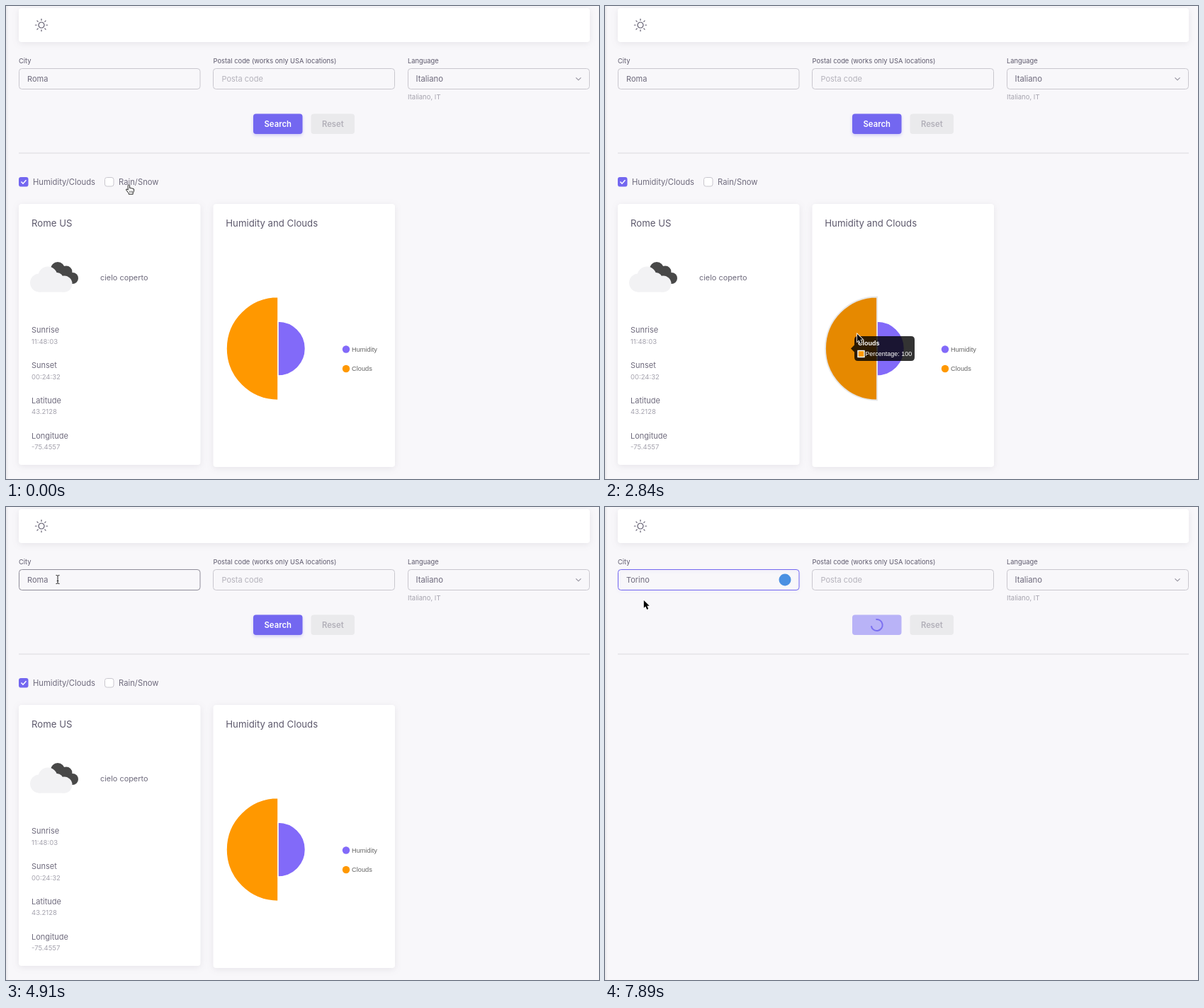
Recreate the animation shown at these times as an HTML page. Size 837 by 669 pixels, loop 8000 ms.

```html
<!DOCTYPE html>
<html lang="en">
<head>
<meta charset="utf-8">
<title>Weather dashboard</title>
<style>
  html, body { margin: 0; width: 100%; height: 100%; overflow: hidden; background: #f8f7fa; }
  svg { display: block; width: 837px; height: 669px; }
  text { font: 11px Inter, sans-serif; fill: #6f6b7d; white-space: pre; }
  .label { font-size: 9.35px; fill: #5d596c; }
  .title { font-size: 13.2px; fill: #5d596c; }
  .small { font-size: 9.5px; fill: #a5a3ae; }
  .check { font-size: 11.25px; }
  .hint { fill: #b4b2bb; }
  .button { font-size: 11.3px; font-weight: 600; text-anchor: middle; }
  .chart { font: 9.25px "Liberation Sans", Arial, sans-serif; fill: #666; }
  #tip text { font: 9px "Liberation Sans", Arial, sans-serif; fill: #fff; }
  #tip .head { font-weight: bold; }
  .field { fill: none; stroke: #c9c7ce; }
  .card { fill: #fff; filter: drop-shadow(0 2px 5px rgba(75, 70, 92, .1)); }
</style>
</head>
<body>
<svg viewBox="0 0 837 669">
  <defs>
    <linearGradient id="edge">
      <stop stop-color="#e9e8ec"/><stop offset="1" stop-color="#f8f7fa"/>
    </linearGradient>
    <path id="tick" d="M21.5 248.5l2.5 2.7 4.5-5" fill="none" stroke="#fff" stroke-width="1.5"/>
    <path id="cloudsArc" d="M384 411.5a73 73 0 0 0 0 146z"/>
    <path id="humidityArc" d="M384 446a38.5 38.5 0 0 1 0 77z"/>
  </defs>
  <rect width="4" height="669" fill="url(#edge)"/>

  <rect class="card" x="18" y="3" width="806" height="48" rx="4"/>
  <g id="sun" fill="none" stroke="#5d596c" stroke-width="1.2" stroke-linecap="round" transform="translate(50 27)">
    <circle r="4"/>
  </g>

  <text class="label" x="18" y="80.5">City</text>
  <text class="label" x="292.5" y="80.5">Postal code (works only USA locations)</text>
  <text class="label" x="567" y="80.5">Language</text>
  <rect id="cityField" class="field" x="18.5" y="88.5" width="255.5" height="29" rx="4"/>
  <rect class="field" x="292.5" y="88.5" width="256" height="29" rx="4"/>
  <rect class="field" x="567.5" y="88.5" width="256" height="29" rx="4"/>
  <rect id="selection" x="30" y="97" width="30" height="13" fill="#b4d5fe"/>
  <text id="city" x="30" y="107.3"></text>
  <rect id="caret" y="97" width="1" height="13" fill="#5d596c"/>
  <circle id="badge" cx="254" cy="103" r="8.5" fill="#4a90e2"/>
  <text class="hint" x="304.5" y="107.3">Posta code</text>
  <text x="578.5" y="106.8" style="font-size:11.3px">Italiano</text>
  <path d="M804.5 101.3l3.5 3.5 3.5-3.5" fill="none" stroke="#8f8c99" stroke-width="1.1"/>
  <text class="small" x="567" y="131.5">Italiano, IT</text>

  <rect id="search" x="349" y="152.5" width="69.5" height="28.5" rx="4"/>
  <text id="searchText" class="button" x="383.7" y="171" style="fill:#fff">Search</text>
  <path id="spinner" d="M5.66 5.66A8 8 0 1 1 5.66 -5.66" fill="none" stroke="#7b70f0" stroke-width="2"/>
  <rect x="430.5" y="152.5" width="61.5" height="28.5" rx="4" fill="#eaeaec"/>
  <text class="button" x="461.3" y="171" style="fill:#b2b0b9">Reset</text>
  <path d="M18 208h806" stroke="#dbdade"/>

  <g id="results">
    <rect x="18" y="242" width="13.5" height="13.5" rx="3" fill="#7367f0"/>
    <use href="#tick"/>
    <text class="check" x="38" y="253">Humidity/Clouds</text>
    <rect id="rainBox" x="139.5" y="242.5" width="12.5" height="12.5" rx="3"/>
    <use id="rainTick" href="#tick" x="121"/>
    <text class="check" x="159" y="253">Rain/Snow</text>

    <rect class="card" x="18" y="280" width="256.5" height="369" rx="4"/>
    <text class="title" x="36" y="312">Rome US</text>
    <g fill="#484848">
      <circle cx="73" cy="372" r="10"/><circle cx="85" cy="376" r="8.5"/>
      <circle cx="94" cy="385" r="8"/><path d="M66 378l14-12 14 27H78z"/>
    </g>
    <g fill="#f2f2f4">
      <circle cx="47" cy="391.5" r="13"/><circle cx="59" cy="382" r="13.5"/>
      <circle cx="72" cy="386" r="9"/><circle cx="82" cy="393" r="11.5"/>
      <rect x="46" y="386" width="37" height="18.5"/>
    </g>
    <text x="133" y="387.6" style="font-size:10.9px">cielo coperto</text>
    <text x="36" y="462">Sunrise</text><text class="small" x="36" y="478">11:48:03</text>
    <text x="36" y="512">Sunset</text><text class="small" x="36" y="527.5">00:24:32</text>
    <text x="36" y="561.7">Latitude</text><text class="small" x="36" y="577.3">43.2128</text>
    <text x="36" y="611.5">Longitude</text><text class="small" x="36" y="626.7">-75.4557</text>

    <rect class="card" x="292.5" y="280" width="256.5" height="372" rx="4"/>
    <text class="title" x="310.3" y="312">Humidity and Clouds</text>
    <g stroke="#fff" stroke-width="1.6">
      <use href="#cloudsArc" fill="#ff9800"/>
      <use href="#humidityArc" fill="#826af9"/>
    </g>
    <g stroke="#e6e6e6" stroke-width="1.8">
      <use id="cloudsHover" href="#cloudsArc" fill="#e68900"/>
      <use id="humidityHover" href="#humidityArc" fill="#5e3dff"/>
    </g>
    <circle cx="480" cy="485.5" r="5.2" fill="#826af9"/>
    <text class="chart" x="488" y="488.8">Humidity</text>
    <circle cx="480" cy="513" r="5.2" fill="#ff9800"/>
    <text class="chart" x="488" y="516.3">Clouds</text>

    <g id="rainCard">
      <rect class="card" x="567" y="280" width="257" height="94" rx="4"/>
      <text class="title" x="585" y="312">Rain and Snow</text>
      <text x="585" y="349">No data</text>
    </g>

    <g id="tip">
      <path id="tipShape" fill="#000" fill-opacity=".8"/>
      <text id="tipHead" class="head" x="5" y="13"></text>
      <rect id="tipColor" x="5" y="20.5" width="9" height="9" stroke="#fff" stroke-width="1.4"/>
      <text id="tipText" x="15.3" y="28.2"></text>
    </g>
  </g>

  <g id="arrow">
    <path d="M0 0v10.8l2.5-2.3 1.9 4.4 2-.9-1.9-4.2h3.4z" stroke="#fff" stroke-width="1.6" paint-order="stroke"/>
  </g>
  <g id="hand">
    <path d="M-1.8 1.2q1.2-1.8 2.4 0v4q1.5-1 2.2.3 1.4-.8 2 .4 2-.3 1.9 1.6-.1 3-1.5 4.6v1.6h-6v-1.4l-3.6-4.6q-.3-1.8 1.6-1l1 1z" fill="#fff" stroke="#222"/>
    <path d="M.7 9v2.6M2.7 9v2.6M4.4 9v2.6" stroke="#222" stroke-width=".7"/>
  </g>
  <g id="beam">
    <path d="M-2.5-6q2 0 2.5 1 .5-1 2.5-1M0-5V5M-2.5 6q2 0 2.5-1 .5 1 2.5 1M-1.2 2h2.4" fill="none" stroke="#222"/>
  </g>
</svg>

<script>
const LOOP = 8000;
const $ = id => document.getElementById(id);

// [time, pointer, x, y]
const pointerSteps = [
  [0, "hand", 174, 252.5],
  [1800, "arrow", 205, 290], [1950, "arrow", 292, 412], [2100, "arrow", 334, 462.5],
  [2690, "arrow", 342, 463], [2840, "arrow", 356, 464], [2990, "arrow", 372, 466],
  [3130, "arrow", 392, 467], [3280, "arrow", 406, 468], [3430, "arrow", 408, 469], [3570, "arrow", 408, 470],
  [3870, "arrow", 400, 440], [4020, "arrow", 385, 385], [4170, "arrow", 340, 320], [4310, "arrow", 270, 250],
  [4460, "arrow", 200, 190], [4610, "arrow", 140, 145], [4760, "beam", 95, 112], [4910, "beam", 73, 102.5],
  [5060, "beam", 50, 103], [5200, "arrow", 14.8, 101.5],
  [7590, "arrow", 22, 108], [7740, "arrow", 40, 123], [7890, "arrow", 54.8, 132]
];
const typing = [[0, "Roma"], [5800, ""], [6250, "T"], [6400, "To"], [6700, "Tori"], [6850, "Torin"], [7150, "Torino"]];
const otherSteps = [300, 1500, 2250, 7440];
const stepTimes = [...pointerSteps, ...typing].map(s => s[0]).concat(otherSteps).sort((a, b) => a - b);

const latest = (steps, t) => steps.filter(s => s[0] <= t).pop();
const easeFrom = (start, t) => 1 - (1 - Math.min(1, Math.max(0, (t - start) / 400))) ** 4;
const mix = (a, b, p) => a + (b - a) * p;
const show = (id, on) => $(id).style.display = on ? "" : "none";
const set = (id, attrs) => { for (const k in attrs) $(id).setAttribute(k, attrs[k]); };

for (let i = 0; i < 8; i++) {
  const ray = document.createElementNS("http://www.w3.org/2000/svg", "path");
  ray.setAttribute("d", "M0-6.8v-1.8");
  ray.setAttribute("transform", `rotate(${i * 45})`);
  $("sun").append(ray);
}

function drawTooltip(t) {
  const enter = easeFrom(1985, t), swap = easeFrom(3060, t), leave = easeFrom(3850, t);
  const onHumidity = t >= 3060;
  const width = mix(85, 80, swap);
  set("cloudsHover", { opacity: enter * (1 - swap) });
  set("humidityHover", { opacity: swap * (1 - leave) });
  set("tip", { opacity: enter * (1 - leave), transform: `translate(${mix(352, 318.6, swap)} 467)` });
  const caret = onHumidity ? `M${width} 12.5l5 5-5 5z` : "M0 12.5l-5 5 5 5z";
  set("tipShape", { d: `M5 0H${width - 5}q5 0 5 5v25q0 5-5 5H5q-5 0-5-5V5q0-5 5-5z${caret}` });
  set("tipColor", { fill: onHumidity ? "#826af9" : "#ff9800" });
  $("tipHead").textContent = onHumidity ? "Humidity" : "Clouds";
  $("tipText").textContent = "Percentage: " + (onHumidity ? 53 : 100);
}

function drawForm(t) {
  const focused = t >= 5060, hovered = t >= 4760, loading = t >= 7440;
  const value = latest(typing, t)[1];
  $("cityField").style.stroke = focused ? "#7367f0" : hovered ? "#8f8d99" : "";
  $("cityField").style.filter = focused ? "drop-shadow(0 2px 2px rgba(115,103,240,.15))" : "";
  $("city").textContent = value || "City";
  $("city").classList.toggle("hint", !value);
  set("caret", { x: 30 + (value ? $("city").getComputedTextLength() : 0) });
  set("selection", t < 5200 ? { x: 50, width: 10 } : { x: 30, width: 30 });
  show("selection", focused && t < 5800);
  show("caret", t >= 5800 && !loading);
  show("badge", focused);

  set("search", { fill: loading ? "#b9b3f7" : "#7367f0" });
  $("search").style.filter = loading ? "" : "drop-shadow(0 2px 2px rgba(115,103,240,.3))";
  set("spinner", { transform: `translate(383.7 167) rotate(${(t - 7440) / 750 * 360})` });
  show("searchText", !loading);
  show("spinner", loading);
  show("results", !loading);
}

function draw(time) {
  const t = stepTimes.filter(s => s <= time).pop();
  const rain = t >= 300 && t < 1500;
  set("rainBox", { fill: rain ? "#7367f0" : "#fff", stroke: rain ? "#7367f0" : "#c9c7ce" });
  show("rainTick", rain);
  show("rainCard", rain);
  drawForm(t);
  drawTooltip(t);
  const [, pointer, x, y] = latest(pointerSteps, t);
  for (const id of ["arrow", "hand", "beam"]) show(id, id === pointer);
  set(pointer, { transform: `translate(${x} ${y})` });
}

const started = performance.now();
function frame() {
  draw((performance.now() - started) % LOOP);
  requestAnimationFrame(frame);
}
frame();
</script>
</body>
</html>
```
